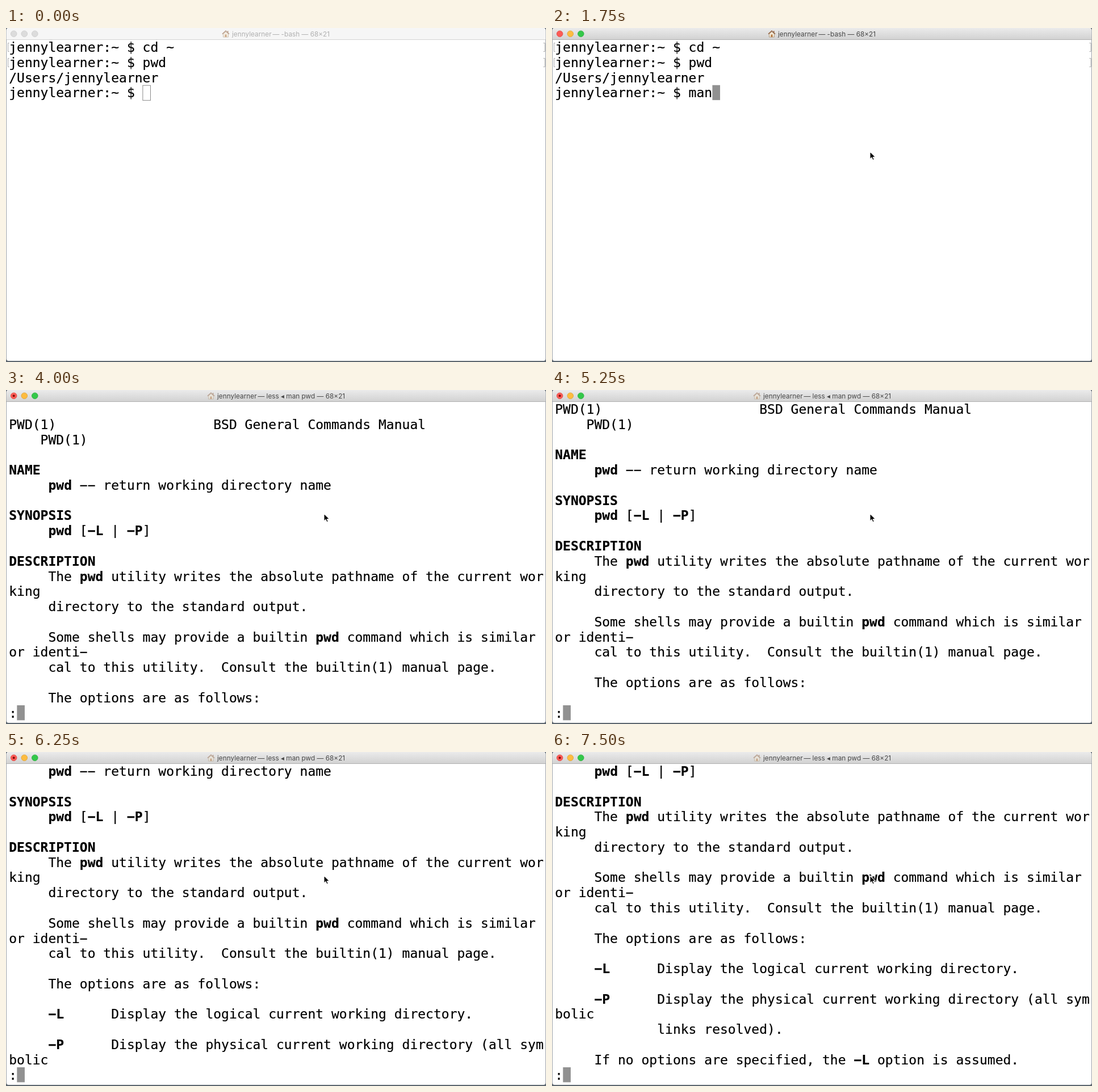
Recreate the animation shown at these times as an HTML page. Size 951x589 px, loop 8000 ms.

```html
<!DOCTYPE html>
<html lang="en">
<head>
<meta charset="utf-8">
<title>Terminal</title>
<style>
  html, body { margin: 0; width: 100%; height: 100%; overflow: hidden; background: #fff; }
  svg { display: block; width: 951px; height: 589px; }
  text { white-space: pre; }
  #rows { font: 23px "DejaVu Sans Mono", monospace; stroke: #000; stroke-width: .2px; }
  #rows .b { font-weight: 700; }
  #title { font: 11.8px Inter, sans-serif; }
</style>
</head>
<body>
<svg viewBox="0 0 951 589">
  <defs>
    <linearGradient id="active" x2="0" y2="1">
      <stop offset="0" stop-color="#ebebeb"/>
      <stop offset="1" stop-color="#d2d2d2"/>
    </linearGradient>
    <clipPath id="frame"><rect x=".6" width="949.8" height="587" rx="4"/></clipPath>
  </defs>
  <rect width="951" height="589" fill="#5d666f"/>
  <g clip-path="url(#frame)">
    <rect width="951" height="589" fill="#fff"/>
    <rect id="bar" width="951" height="20"/>
    <rect id="rule" y="20" width="951" height="1"/>
  </g>
  <g id="buttons" stroke-width=".8">
    <circle cx="13.7" cy="10.2" r="5.3"/>
    <circle cx="32.3" cy="10.2" r="5.3"/>
    <circle cx="50.8" cy="10.2" r="5.3"/>
  </g>
  <circle id="dot" cx="13.7" cy="10.2" r="2" fill="#7d0d0a"/>
  <g id="house">
    <path d="M2 7L6.5 3 11 7V12.500H2z" fill="#f3ead9" stroke="#a58d72" stroke-width=".8"/>
    <path d="M.5 7.200L6.500 1.500 12.500 7.200" fill="none" stroke="#96694a" stroke-width="1.6"/>
    <path d="M9.500 1.500h1.500v3h-1.500z" fill="#96694a"/>
    <path d="M5 8h3v4.500H5z" fill="#b5773f"/>
  </g>
  <g id="title"><text id="user" y="14.600">jennylearner</text><text id="job" y="14.600"></text></g>
  <path id="marks" fill="none" stroke="#a9a9a9"
    d="M5.500 26.500h-2v15h2M5.500 53.500h-2v15h2M946.500 26.500h2.500v15h-2.500M946.500 53.500h2.500v15h-2.500"/>
  <rect id="caret" width="13.600" height="26.400"/>
  <g id="rows"></g>
  <path id="mouse" d="M1 1V14.300L4 11.500 6.100 16 8.400 15 6.400 10.700H10.600z"
    fill="#000" stroke="#fff" stroke-width="1.100" stroke-linejoin="round"/>
</svg>
<script>
const LOOP = 8000, COL = 13.846, ROW = 26.78, LAST = 20;
const $ = id => document.getElementById(id);
const set = (el, attrs) => { for (const k in attrs) el.setAttribute(k, attrs[k]); };
const show = (el, on) => el.setAttribute('visibility', on ? 'visible' : 'hidden');

const prompt = 'jennylearner:~ $ ';
const shell = [prompt + 'cd ~', prompt + 'pwd', '/Users/jennylearner'];

// Asterisks enclose bold text.
const manual = `
PWD(1)                    BSD General Commands Manual
    PWD(1)

*NAME*
     *pwd* -- return working directory name

*SYNOPSIS*
     *pwd* [*-L* | *-P*]

*DESCRIPTION*
     The *pwd* utility writes the absolute pathname of the current wor
king
     directory to the standard output.

     Some shells may provide a builtin *pwd* command which is similar
or identi-
     cal to this utility.  Consult the builtin(1) manual page.

     The options are as follows:

     *-L*      Display the logical current working directory.

     *-P*      Display the physical current working directory (all sym
bolic
             links resolved).

     If no options are specified, the *-L* option is assumed.`.split('\n');

// Each pair holds a start time and the value from then on.
const typing = [[0, ''], [1500, 'ma'], [1750, 'man'], [3000, 'man '], [3250, 'man pw'], [3500, 'man pwd']];
const scroll = [[0, 0], [5250, 1], [5750, 2], [6000, 3], [6250, 5], [6500, 6], [6750, 7], [7000, 8]];
const at = (steps, t) => steps.filter(s => s[0] <= t).pop()[1];

const rows = Array.from({ length: LAST + 1 }, (_, i) => {
  const el = document.createElementNS('http://www.w3.org/2000/svg', 'text');
  set(el, { x: 5.2, y: 42 + i * ROW });
  return $('rows').appendChild(el);
});

const markup = line => line.replace(/-/g, '\u2212').split('*')
  .map((s, i) => i % 2 ? `<tspan class="b">${s}</tspan>` : s).join('');

function drawText(lines) {
  rows.forEach((el, i) => {
    const line = lines[i] || '';
    if (el.line !== line) el.innerHTML = markup(el.line = line);
  });
}

function drawCaret(col, row, solid) {
  const inset = solid ? 0 : .5;
  set($('caret'), {
    x: (solid ? 5.5 : 5) + col * COL + inset, y: 20.4 + row * ROW + inset,
    fill: solid ? '#919191' : 'none', stroke: solid ? 'none' : '#8c8c8c'
  });
}

function drawBar(focused, paging) {
  set($('bar'), { fill: focused ? 'url(#active)' : '#f6f6f6' });
  set($('rule'), { fill: focused ? '#b1b1b1' : '#d3d3d3' });
  const fills = ['#fc5b56', '#fdbc40', '#34c84a'], rims = ['#e0443f', '#dfa032', '#25aa37'];
  [...$('buttons').children].forEach((c, i) => set(c, {
    fill: focused ? fills[i] : '#dcdcdc', stroke: focused ? rims[i] : '#c9c9c9'
  }));
  show($('dot'), paging);
  const x = paging ? 372 : 398;
  set($('house'), { transform: `translate(${x - 17.5} 3.5)`, opacity: !focused ? .6 : paging ? .5 : 1 });
  set($('title'), { fill: focused ? '#484848' : '#b0b0b0' });
  set($('user'), { x });
  set($('job'), { x: x + 71.5 });
  $('job').textContent = paging ? '— less ◂ man pwd — 68×21' : '— -bash — 68×21';
}

function draw(t) {
  const reading = t >= 3750, focused = t >= 750;
  drawBar(focused, t >= 4000);
  show($('marks'), !reading);
  if (reading) {
    const top = at(scroll, t), page = manual.slice(top, top + LAST);
    page[LAST] = ':';
    drawText(page);
    drawCaret(1, LAST, true);
  } else {
    const line = prompt + at(typing, t);
    drawText([...shell, line]);
    drawCaret(line.length, 3, focused);
  }
  show($('mouse'), t >= 250);
  set($('mouse'), { transform: t < 500 ? 'translate(924 119)' : 'translate(559 217)' });
}

const start = performance.now();
function tick() {
  draw((performance.now() - start) % LOOP);
  requestAnimationFrame(tick);
}
tick();
</script>
</body>
</html>
```
